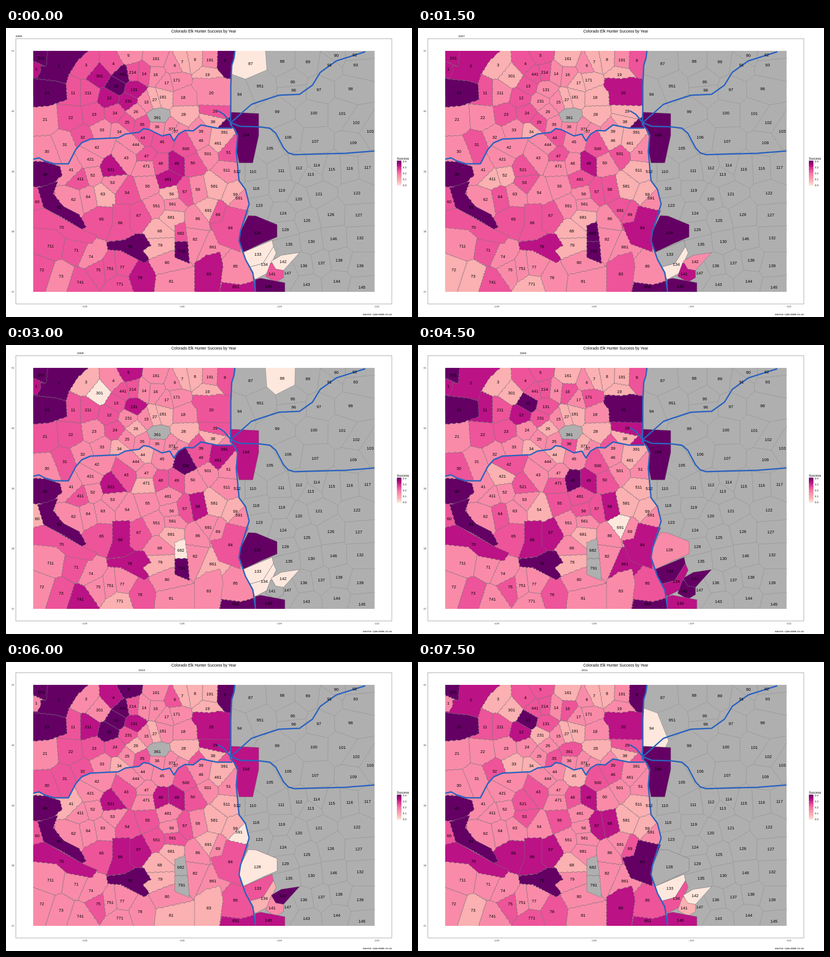
Write an HTML page that moves like this. It is 885x632 px and loops after 8000 ms.

```html
<!DOCTYPE html>
<html lang="en">
<head>
<meta charset="utf-8">
<title>Colorado Elk Hunter Success by Year</title>
<style>
html, body { margin: 0; width: 100%; height: 100%; overflow: hidden; background: #fff; }
svg { display: block; width: 100vw; height: 100vh; font-family: "Liberation Sans", Arial, sans-serif; }
#west, #landmarks { stroke: #77717a; stroke-width: .75; stroke-linejoin: round; }
#plains { stroke: #8c8c8c; stroke-width: .6; }
#roads { fill: none; stroke: #2c63be; stroke-width: 3; stroke-linejoin: round; }
#labels { font-size: 9.2px; text-anchor: middle; }
#axes { font-size: 6px; fill: #4d4d4d; text-anchor: middle; }
#key { font-size: 5.6px; }
</style>
</head>
<body>
<svg viewBox="0 0 885 632">
  <defs>
    <clipPath id="state"><rect x="59.5" y="50" width="744" height="527"/></clipPath>
    <clipPath id="westSide"></clipPath>
    <clipPath id="northSide"></clipPath>
    <linearGradient id="ramp" x1="0" y1="1" x2="0" y2="0"></linearGradient>
  </defs>
  <rect width="885" height="632" fill="#fff"/>
  <text x="431" y="9.5" font-size="8.5" text-anchor="middle">Colorado Elk Hunter Success by Year</text>
  <text id="year" y="20" font-size="6.2" text-anchor="middle"></text>
  <rect x="21.5" y="23.5" width="819.5" height="580" fill="none" stroke="#8a8a8a" stroke-width=".8"/>
  <g clip-path="url(#state)">
    <g id="plains"></g>
    <g id="west" clip-path="url(#westSide)">
      <g id="south"></g>
      <g id="north" clip-path="url(#northSide)"></g>
    </g>
    <g id="landmarks"></g>
    <g id="roads"></g>
    <g id="labels"></g>
  </g>
  <g id="axes"></g>
  <text x="841" y="627.5" font-size="6.1" text-anchor="end">source: cpw.state.co.us</text>
  <text x="852" y="287.5" font-size="7">Success</text>
  <rect x="852" y="290" width="10" height="55" fill="url(#ramp)"/>
  <g id="key"></g>
</svg>
<script>
const $ = id => document.getElementById(id);
const colors = { cream: '#fee8de', pale: '#fbb0b1', pink: '#f98ba8', rose: '#ee5499',
  deep: '#bb1285', dark: '#640064', none: '#afafaf' };

function add(parent, tag, attrs, text = '') {
  const node = document.createElementNS('http://www.w3.org/2000/svg', tag);
  for (const key in attrs) node.setAttribute(key, attrs[key]);
  node.textContent = text;
  return parent.appendChild(node);
}

// Axes and colour key
for (let i = 0; i < 5; i++) {
  add($('axes'), 'text', { x: 15, y: 52 + 131.75 * i }, 41 - i);
  if (i < 4) add($('axes'), 'text', { x: 171 + 212.3 * i, y: 611 }, 2 * i - 108);
  const y = 344 - 13 * i;
  add($('key'), 'path', { d: `M852 ${y}h2m6 0h2`, stroke: '#fff', 'stroke-width': .4 });
  add($('key'), 'text', { x: 865, y: y + 2 }, (i / 10).toFixed(1));
}
['cream', 'pale', 'pink', 'rose', 'deep', 'dark'].forEach((name, i) =>
  add($('ramp'), 'stop', { offset: i / 5, 'stop-color': colors[name] }));

// Roads, two of which also divide the state
const northSouth = 'M499 50L497 66 492 82 490 125 490 180 489 211 499 222 505 235 502 270 508 334 522 353 530 385 511 445 508 465 522 506 538 535 544 577';
const westward = 'M59 287L72 284 85 291 105 297 136 297 152 266 165 251 184 243 245 240 260 232 290 228 300 220 312 222 340 236 357 232 366 247 376 232 390 224 408 225 425 212 460 219 493 219';
const eastward = 'M490 207L510 215 550 216 575 219 588 230 605 262 615 273 628 277 740 274 803 269';
const diagonal = 'M462 181L475 189 490 207 535 167 555 160 595 147 640 145 668 125 685 97 720 72 783 52';
for (const d of [northSouth, westward, eastward, diagonal]) add($('roads'), 'path', { d });
add($('westSide'), 'path', { d: northSouth + 'V590H50V40Z' });
add($('northSide'), 'path', { d: westward + 'H510V40H50Z' });

// Units: names spread evenly from one point to another
const units = [];
function spread(area, names, x, y, u = x, v = y) {
  names.split(' ').forEach((name, i, all) => {
    const t = i / Math.max(1, all.length - 1);
    units.push({ name, area, x: x + (u - x) * t, y: y + (v - y) * t });
  });
}
const [north, south, plains] = ['north', 'south', 'plains'].map(area => spread.bind(null, area));

north('201 1', 77, 66, 66, 90);
north('2 3 4', 115, 83, 234, 78);
north('5 161', 267, 60, 327, 67);
north('6 7', 368, 82, 384, 74);
north('8 191 9', 412, 69, 477, 71);
north('10 11', 89, 142, 146, 142);
north('211 301', 179, 142, 204, 105);
north('12 13 441', 225, 153, 255, 101);
north('214 14 16', 276, 97, 326, 102);
north('131 231', 279, 135, 267, 160);
north('17 171', 350, 120, 372, 114);
north('15 27 181', 306, 162, 342, 151);
north('18 28', 386, 152, 387, 189);
north('19 20 29', 439, 102, 456, 182);
north('21 22', 85, 200, 141, 196);
north('23 24 26', 192, 189, 283, 183);
north('25 35 36 371', 264, 206, 362, 221);
north('361 37', 330, 196, 370, 226);
north('38 39', 451, 205, 425, 226);
north('391', 476, 228);
north('30 31 32', 89, 270, 167, 239);
north('33 34', 209, 223, 247, 227);

south('42 421', 198, 261, 184, 287);
south('444 43', 283, 255, 262, 284);
south('44 45', 298, 240, 340, 249);
south('46 461', 425, 246, 462, 252);
south('500 501', 392, 264, 440, 275);
south('51 511', 485, 272, 481, 311);
south('47 471', 306, 280, 306, 302);
south('48 49 50', 337, 296, 407, 295);
south('40 41', 85, 320, 142, 310);
south('411 52', 162, 330, 189, 322);
south('521 53', 229, 310, 232, 338);
south('54 55 481', 264, 360, 353, 331);
south('60 61', 68, 380, 116, 392);
south('62 64 63', 147, 375, 211, 363);
south('56 57 58', 361, 363, 418, 353);
south('551 561', 328, 389, 363, 385);
south('581 591', 454, 346, 508, 372);
south('59', 500, 364);
south('691 69', 441, 399, 462, 408);
south('86 84', 418, 417, 489, 437);
south('681 68', 360, 414, 335, 444);
south('65 70', 208, 418, 121, 436);
south('66 67', 249, 426, 289, 410);
south('711 71', 97, 477, 153, 486);
south('72 73 741', 78, 529, 162, 556);
south('74 76', 185, 500, 270, 478);
south('75 751 77', 201, 529, 253, 523);
south('771 78', 248, 560, 292, 546);
south('79 80', 336, 475, 351, 513);
south('682 791', 381, 449, 383, 488);
south('82 861', 412, 462, 451, 479);
south('81 83', 360, 554, 442, 538);
south('85 851', 500, 521, 501, 566);

plains('87', 533, 78);
plains('88 89', 602, 73, 658, 74);
plains('90 92', 720, 60, 760, 59);
plains('91 93', 705, 81, 762, 81);
plains('95 96', 625, 118, 627, 136);
plains('951 97', 554, 127, 682, 135);
plains('94 98', 509, 145, 751, 133);
plains('99 100', 591, 183, 671, 186);
plains('101 102 103', 733, 187, 794, 226);
plains('104', 523, 234);
plains('105 106', 575, 263, 615, 239);
plains('107 109', 674, 248, 757, 251);
plains('110 113', 538, 314, 664, 320);
plains('111 112 114', 600, 312, 677, 300);
plains('115 116 117', 710, 309, 788, 305);
plains('512 118', 504, 314, 545, 351);
plains('119 120', 601, 355, 638, 374);
plains('121 122', 682, 363, 765, 361);
plains('123 124 125', 552, 388, 656, 421);
plains('126 127', 708, 408, 769, 409);
plains('128 129', 548, 448, 609, 441);
plains('135 130 146', 617, 473, 714, 461);
plains('132 139', 772, 459, 772, 520);
plains('136 137 138', 649, 520, 726, 508);
plains('143 144', 655, 561, 721, 554);
plains('133 134', 549, 495, 563, 517);
plains('141 140', 580, 538, 572, 565);
plains('142 147', 604, 511, 614, 536);
plains('145', 776, 567);

// Large or unusual units that a plain division of the land would miss
const landmarks = {
  2: '91,45 184,45 155,73 137,102 131,122 110,116 55,110 68,108 76,95 75,84 88,83',
  10: '55,110 110,116 131,122 133,157 95,170 55,174',
  20: '408,109 445,111 465,107 490,112 490,170 417,168 416,142 404,126',
  40: '55,291 87,293 118,303 122,322 98,345 55,348',
  61: '69,350 113,335 103,362 125,390 160,408 175,435 165,440 118,412 82,393',
  70: '55,401 82,393 165,440 199,455 187,472 133,462 110,442 55,436',
  76: '219,468 260,463 282,450 300,450 316,475 299,487 313,506 302,514 250,487 222,485',
  66: '232,385 270,384 270,440 282,450 260,463 218,468 232,430',
  83: '411,514 437,497 467,490 473,520 465,582 411,582',
  84: '445,428 470,423 480,389 529,400 511,445 511,490 463,472',
  851: '465,582 470,556 512,561 543,553 545,582',
  682: '368,432 390,423 396,467 368,467',
  791: '368,467 396,467 400,515 368,502',
  104: '490,184 551,187 551,235 538,295 508,295 503,270 505,240 490,207',
  128: '528,410 545,411 591,430 591,457 560,470 516,491 508,465 511,445',
  133: '516,491 580,464 583,478 560,515 530,523',
  134: '530,523 560,515 583,478 589,492 568,537 543,550',
  141: '577,513 605,530 605,546 588,556 566,543',
  142: '578,510 600,497 640,491 605,530 588,527',
  140: '543,550 555,547 608,557 608,582 545,582'
};

// Keep the part of a polygon that lies nearer to site a than to site b.
function nearer(polygon, a, b) {
  const side = ([x, y]) => (x - (a.x + b.x) / 2) * (b.x - a.x) + (y - (a.y + b.y) / 2) * (b.y - a.y);
  return polygon.flatMap((p, i) => {
    const q = polygon[(i + 1) % polygon.length], s = side(p), t = side(q), k = s / (s - t);
    const kept = s <= 0 ? [p] : [];
    return s * t < 0 ? [...kept, [p[0] + (q[0] - p[0]) * k, p[1] + (q[1] - p[1]) * k]] : kept;
  });
}

// Bend borders by position, so neighbours share the same ragged edge.
const bend = (x, y) => [x + Math.sin(y * 1.1 + x * .5), y + Math.sin(x * 1.3 - y * .4)];
const ragged = polygon => polygon.flatMap(([x, y], i) => {
  const [u, v] = polygon[(i + 1) % polygon.length];
  const n = Math.ceil(Math.hypot(u - x, v - y) / 3.5);
  return Array.from({ length: n }, (_, k) => bend(x + (u - x) * k / n, y + (v - y) * k / n));
});

const frame = [[50, 40], [812, 40], [812, 587], [50, 587]];
for (const unit of units) {
  const outline = landmarks[unit.name];
  const rivals = units.filter(u => u !== unit && u.area === unit.area && !landmarks[u.name]);
  const shape = outline ? outline.split(' ').map(p => p.split(',').map(Number))
    : rivals.reduce((polygon, rival) => nearer(polygon, unit, rival), frame);
  unit.node = add($(outline ? 'landmarks' : unit.area), 'polygon',
    { points: (unit.area === 'plains' ? shape : ragged(shape)).join(' ') });
  add($('labels'), 'text', { x: unit.x, y: unit.y + 3.3 }, unit.name);
}

// Shades: what is usual, then what differs in each year
const usual = {
  dark: '2 201 10 13 40 61 76 791 851 104 128 140',
  deep: '1 12 20 49 66 70 84',
  rose: '4 5 9 11 211 214 22 23 24 35 29 391 441 131 48 481 500 521 54 57 58 60 65 67 69 741 75 78 83 85',
  pale: '3 7 8 19 191 161 181 26 27 28 301 34 38 461 511 581 59 68 681 691 79',
  none: '361'
};
const years = [
  { dark: '9 441 391', deep: '131 231 301 521 481 78 83 851', cream: '87 133 134 142', pale: '56 63',
    rose: '3 14 25 32 411 44 45 47 50 51 66 682 70 71 711 72 751 77 771 84 141', pink: '5 20 26 34 58 85 161 191 511' },
  { dark: '391 682', deep: '2 201 76 141', cream: '134', pale: '17 171 18 29 411 46 52 72 73 771',
    rose: '12 13 25 31 44 47 481 501 53 64 66 70 71 691', pink: '22 26 35 48 54 75 78 85 131 142 191 211' },
  { dark: '500', deep: '5 58 66 76 104 131 461 521 741', cream: '88 133 134 142 301 682', pale: '44 471 60 771 861',
    rose: '12 13 20 21 31 39 411 43 46 49 70 71 73 84', pink: '4 23 35 51 54 68 69 75 83 85 161 191 391 481 511 691' },
  { dark: '20 48 133 141 142', deep: '2 11 29 391 58 67 134 140 861', cream: '691', pale: '371 421 44 54',
    rose: '16 30 36 39 42 471 50 55 56 64 73 171 231', pink: '24 35 53 68 69 83 128 741', none: '682 791' },
  { dark: '5 9 12 441 142', deep: '4 20 29 48 67 104 131 140 211 521 851', cream: '128 591', pale: '41 81 83 134',
    rose: '6 30 31 32 39 43 50 55 84 133 231 551 561', pink: '1 3 58 69 78 141 161 181 301 481 741', none: '682 791' },
  { dark: '9 84', deep: '2 57 58 65 67 83 140 851', cream: '94 133 142', pale: '33 45 73 141 231', none: '682 791 128',
    rose: '16 32 361 43 46 53 55 134 771', pink: '1 19 22 23 24 26 54 79 191 461 481 681 691 741' }
];
const shadeIn = (tiers, name) => Object.keys(tiers).find(tier => tiers[tier].split(' ').includes(name));
const shade = ({ name, area }, year) =>
  colors[shadeIn(year, name) || shadeIn(usual, name) || (area === 'plains' ? 'none' : 'pink')];

let shown = -1;
function draw() {
  const index = Math.floor(performance.now() % 8000 / 1500);
  if (index !== shown) {
    shown = index;
    for (const unit of units) unit.node.setAttribute('fill', shade(unit, years[index]));
    $('year').textContent = 2006 + index;
    $('year').setAttribute('x', 28 + 67 * index);
  }
  requestAnimationFrame(draw);
}
draw();
</script>
</body>
</html>
```
